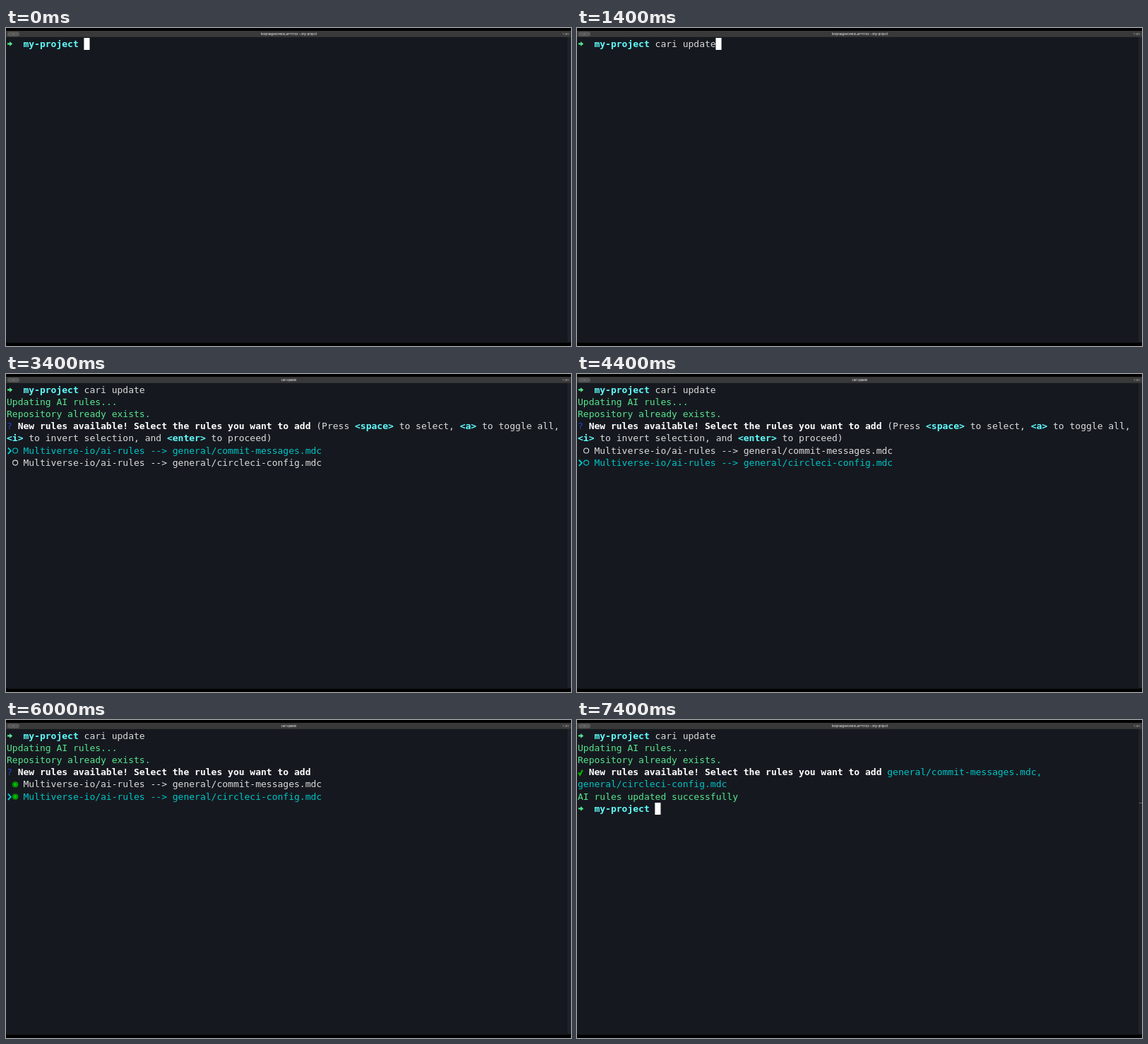
An HTML page that plays this animation: 800 by 450 pixels, repeating every 8 s.

```html
<!DOCTYPE html>
<html lang="en">
<head>
<meta charset="utf-8">
<title>Terminal</title>
<style>
  html, body { margin: 0; width: 100%; height: 100%; overflow: hidden; background: #000; }
  svg { display: block; width: 100vw; height: 100vh; }
  text { white-space: pre; }
  #screen { font: 13px "DejaVu Sans Mono", monospace; }
  .bar { font: 600 4px Inter, sans-serif; fill: #d2d2d2; }
</style>
</head>
<body>
<svg viewBox="0 0 800 450">
  <rect width="800" height="450" fill="#000"/>
  <path d="M0 4H800V443Q800 445.500 797.500 445.500H2.500Q0 445.500 0 443Z" fill="#15191f"/>
  <rect x="795" y="13" width="5" height="431" fill="#1f2329"/>
  <rect y="4" width="800" height="8.800" fill="#393939"/>
  <rect x="2" y="5.200" width="17" height="6.600" rx="3.300" fill="#595959"/>
  <circle cx="10.500" cy="8.500" r="1" fill="#777"/>
  <text class="bar" id="title" x="400.500" y="9.900" text-anchor="middle"></text>
  <text class="bar" x="797" y="9.700" text-anchor="end" style="fill:#999">⌥⌘1</text>
  <g id="screen"></g>
</svg>
<script>
const LOOP = 8000, COL = 7.826, ROW = 17.17, LEFT = 1, TOP = 14;
const C = {
  fg: '#dcdcdc', white: '#fff', bg: '#15191f', lime: '#57e690', aqua: '#60fdff',
  cyan: '#00c5c7', green: '#00c200', blue: '#2744c7'
};
const SHELL_TITLE = 'tobyhal@WORKSLAPT1702:~/my-project';
const COMMAND = 'cari update';
const QUESTION = 'New rules available! Select the rules you want to add';
const FILES = ['general/commit-messages.mdc', 'general/circleci-config.mdc'];
const PROMPT_COL = 14;

// Typed character count at each key time
const TYPING = [[600, 1], [700, 2], [800, 4], [900, 5], [1100, 6], [1200, 8], [1300, 10], [1400, 11]];

const screen = document.getElementById('screen');
const title = document.getElementById('title');
const colX = col => LEFT + col * COL;
const rowY = row => TOP + row * ROW;
const escapeText = s => s.replace(/&/g, '&amp;').replace(/</g, '&lt;');

function text(row, col, str, fill = C.fg, bold = false) {
  return `<text x="${colX(col)}" y="${rowY(row) + 12.8}" fill="${fill}"` +
    `${bold ? ' font-weight="700"' : ''}>${escapeText(str)}</text>`;
}

// Consecutive [string, colour, bold] parts on one row
function line(row, col, ...parts) {
  return parts.map(([str, fill, bold]) => {
    const out = text(row, col, str, fill, bold);
    col += str.length;
    return out;
  }).join('');
}

function icon(row, d, attrs) {
  return `<path transform="translate(0 ${rowY(row)})" d="${d}" ${attrs}/>`;
}

function prompt(row) {
  return icon(row, 'M2 7.300H5.200V5L9.200 8.400 5.200 11.800V9.500H2Z', `fill="${C.lime}"`) +
    text(row, 3, 'my-project', C.aqua, true);
}

function cursor(row, col, under = '') {
  return `<rect x="${colX(col) - 0.2}" y="${rowY(row)}" width="8.100" height="17" fill="#fff"/>` +
    text(row, col, under, C.bg);
}

function choice(row, file, active, checked) {
  const color = active ? C.cyan : C.fg;
  const cy = rowY(row) + 8.6;
  const ring = checked ? C.green : color;
  return (active ? icon(row, 'M2.800 4.500L6.800 8.800 2.800 13.100', `fill="none" stroke="${color}" stroke-width="2"`) : '') +
    `<circle cx="13.100" cy="${cy}" r="3.500" fill="none" stroke="${ring}" stroke-width="1.100"/>` +
    (checked ? `<circle cx="13.100" cy="${cy}" r="2.500" fill="${ring}"/>` : '') +
    text(row, 3, 'Multiverse-io/ai-rules --> ' + file, color);
}

function commandLine(t) {
  const typed = TYPING.reduce((n, [at, count]) => t >= at ? count : n, 0);
  const shown = typed ? COMMAND : '';
  return prompt(0) + text(0, PROMPT_COL, shown) +
    (t < 1800 ? cursor(0, PROMPT_COL + typed, shown[typed]) : '');
}

function menu(t) {
  const hint = t < 5200;
  const active = (t >= 4400 && t < 4800) || t >= 5500 ? 1 : 0;
  const checked = [t >= 5200, t >= 6000];
  const first = hint ? 5 : 4;
  let out = line(3, 0, ['? ', C.blue], [QUESTION, C.white, true]);
  if (hint) {
    out += line(3, 56, ['(Press '], ['<space>', C.aqua, true], [' to select, '],
      ['<a>', C.aqua, true], [' to toggle all,']);
    out += line(4, 0, ['<i>', C.aqua, true], [' to invert selection, and '],
      ['<enter>', C.aqua, true], [' to proceed)']);
  }
  return out + FILES.map((f, i) => choice(first + i, f, i === active, checked[i])).join('');
}

function result(t) {
  let out = icon(3, 'M2 9L4.200 12.200 7.800 5.200', `fill="none" stroke="${C.green}" stroke-width="2"`) +
    line(3, 2, [QUESTION, C.white, true], [' ' + FILES[0] + ',', C.cyan]) +
    text(4, 0, FILES[1], C.cyan);
  if (t < 7000) return out + cursor(5, 0);
  out += text(5, 0, 'AI rules updated successfully', C.lime);
  if (t < 7200) return out + cursor(6, 0);
  return out + prompt(6) + cursor(6, PROMPT_COL) +
    '<rect x="796" y="117" width="4" height="1" fill="#666a70"/>';
}

function render(t) {
  title.textContent = t >= 1800 && t < 7200 ? COMMAND : SHELL_TITLE;
  let out = commandLine(t);
  if (t >= 2200) out += text(1, 0, 'Updating AI rules...', C.lime);
  if (t >= 2300) out += text(2, 0, 'Repository already exists.', C.lime);
  if (t >= 6800) out += result(t);
  else if (t >= 3400) out += menu(t);
  else if (t >= 1800) out += cursor(t < 2200 ? 1 : t < 2300 ? 2 : 3, 0);
  screen.innerHTML = out;
}

const start = performance.now();
function tick(now) {
  render(Math.max(0, now - start) % LOOP);
  requestAnimationFrame(tick);
}
render(0);
requestAnimationFrame(tick);
</script>
</body>
</html>
```
